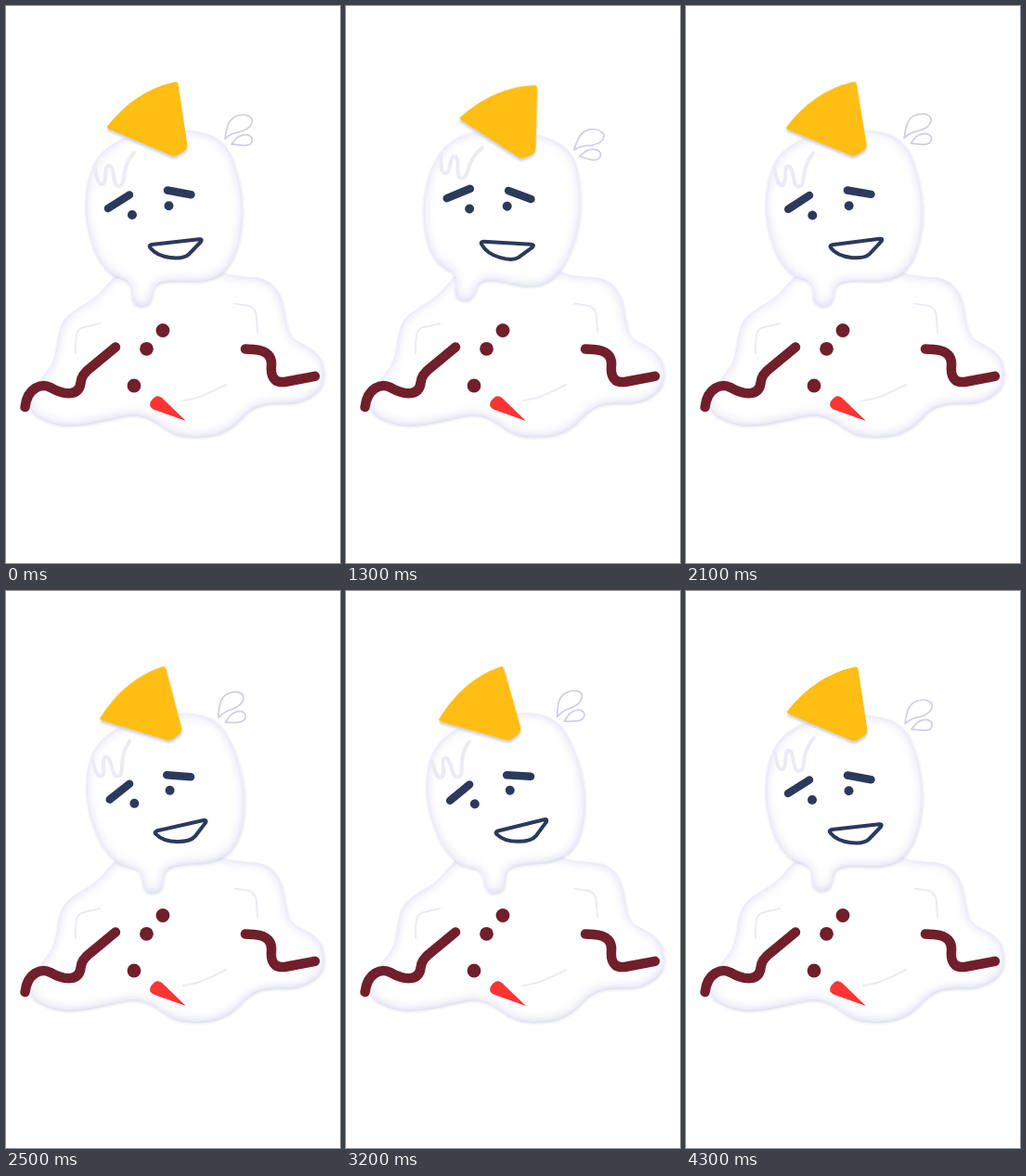
An HTML page for the animation above (4400 ms loop, 360 by 600 pixels).

```html
<!DOCTYPE html>
<html lang="en">
<head>
<meta charset="utf-8">
<title>Melting snowman</title>
<style>
  html, body { margin: 0; height: 100%; overflow: hidden; background: #fff; }
  svg { display: block; width: 100%; height: 100%; }
  .line { fill: none; stroke-linecap: round; stroke-linejoin: round; }
  .crease { stroke: #ebebf2; stroke-width: 2; }
  .scribble { stroke: #ebebf4; stroke-width: 4; }
  .arm { stroke: #701f2b; stroke-width: 10.5; }
  .brow { stroke: #2b395c; stroke-width: 8.5; }
  .mouth { stroke: #2b395c; stroke-width: 4; fill: #fff; }
  .sweat { stroke: #d0cee0; stroke-width: 1.7; }
</style>
</head>
<body>
<svg viewBox="0 0 360 600">
  <defs>
    <!-- Soft lavender rim inside the shape plus a faint shadow below it -->
    <filter id="snow" x="-10%" y="-10%" width="120%" height="120%" color-interpolation-filters="sRGB">
      <feFlood flood-color="#d6d6ec"/>
      <feComposite in2="SourceAlpha" operator="out"/>
      <feGaussianBlur stdDeviation="6"/>
      <feComposite in2="SourceAlpha" operator="in" result="rim"/>
      <feDropShadow in="SourceGraphic" dx="0.5" dy="2" stdDeviation="1.5" flood-color="#c9cae2" flood-opacity=".65" result="base"/>
      <feMerge><feMergeNode in="base"/><feMergeNode in="rim"/></feMerge>
    </filter>
    <filter id="hatShadow" x="-10%" y="-10%" width="120%" height="125%" color-interpolation-filters="sRGB">
      <feDropShadow dx="0" dy="3" stdDeviation="1" flood-color="#c6c8e2" flood-opacity=".8"/>
    </filter>
  </defs>

  <g id="body">
    <path filter="url(#snow)" fill="#fff" d="M119 290C110 297 104 308 94 315C82 323 67 330 61 341C54 354 56 372 50 384C45 395 31 406 27 418C23 430 27 438 36 443C48 449 60 452 72 451C92 450 112 444 128 441C150 436 162 449 175 457C186 464 203 464 216 463C234 461 245 453 254 443C262 435 269 430 281 428C295 426 306 429 318 425C333 420 342 411 343 399C344 384 338 375 327 368C317 362 308 360 305 351C300 338 301 324 295 311C288 296 276 292 261 292C248 290 240 291 232 286Z"/>
    <g class="line crease">
      <path d="M75 374C75 351 76 348 84 346L101 342"/>
      <path d="M246 320.5L262 323Q270 326 270 336L271 351"/>
      <path d="M191 425C206 423 211 421 237 408"/>
    </g>
    <g class="line arm">
      <path d="M20.5 432C23 411 38 406 48 411C62 419 79 421 80.500 406C81 399 85 394 92 389L118 367.500"/>
      <path d="M258 369.500L267 370C282 371 287 378 286 388C285 404 293 406.500 303 404.500L333 398.800"/>
    </g>
    <g fill="#701f2b">
      <circle cx="169" cy="349.500" r="7.400"/>
      <circle cx="151.500" cy="369.300" r="7.400"/>
      <circle cx="138" cy="409" r="7.400"/>
    </g>
    <path fill="#fe3434" d="M194 447L159 434.500Q153 431 156 426Q162 417 168 422Z"/>
  </g>

  <g id="head">
    <path filter="url(#snow)" fill="#fff" d="M178 134C215 132 234 141 243 162C251 181 255 203 255 222C254 249 248 270 237 283C227 295 211 297 196 296C183 295 169 295 163 299C156 304 160 315 154 320C149 324 140 324 137 318C133 311 138 302 131 296C126 292 118 292 111 286C97 273 92 256 88 238C83 213 86 185 97 166C112 143 142 134 178 134Z"/>
    <path class="line scribble" d="M95.500 173C98 182 98 192 103 192C110 192 105 173 110 172C118 171 114 194 121 194C131 194 122 176 138 158"/>
    <path filter="url(#hatShadow)" fill="#ffbe14" d="M181 82Q140 91 109.500 129Q108 131 111 132.500L178 161Q182 162.500 186 160L193 155.500Q195.800 153 195.300 149L185.500 84Q185 81 181 82Z"/>
    <path class="line brow" d="M110 218L133 203.500M174 198.500L199.500 203.200"/>
    <g fill="#2b395c">
      <circle cx="136" cy="225" r="5"/>
      <circle cx="175.500" cy="215.200" r="5"/>
    </g>
    <path class="line mouth" d="M157 257Q153 258 156 261C165 272.500 190 274 197 267.500L210 254Q212 250.800 208 251.200Z"/>
    <g class="line sweat">
      <path d="M236 143C238 130 240 122 248 118.800C258 115 268 119 264.500 127C262 134 250 136 246 137Q240 139 236 143Z"/>
      <path d="M243 148.800C247 144 250 139.500 256 138.800C263 137.500 267 142 264.500 147C262 152 252 150 243 148.800Z"/>
    </g>
  </g>
</svg>
<script>
  const LOOP = 4400;
  const head = document.getElementById("head");
  // [time in ms, tilt in degrees]
  const tilts = [[0, 0], [1310, 10], [2780, -10], [4300, 0], [LOOP, 0]];

  function tiltAt(time) {
    const next = tilts.findIndex(([end]) => time < end);
    const [start, from] = tilts[next - 1];
    const [end, to] = tilts[next];
    return from + (to - from) * (time - start) / (end - start);
  }

  function draw() {
    const time = performance.now() % LOOP;
    head.setAttribute("transform", `rotate(${tiltAt(time)} 172 205)`);
    requestAnimationFrame(draw);
  }
  draw();
</script>
</body>
</html>
```
